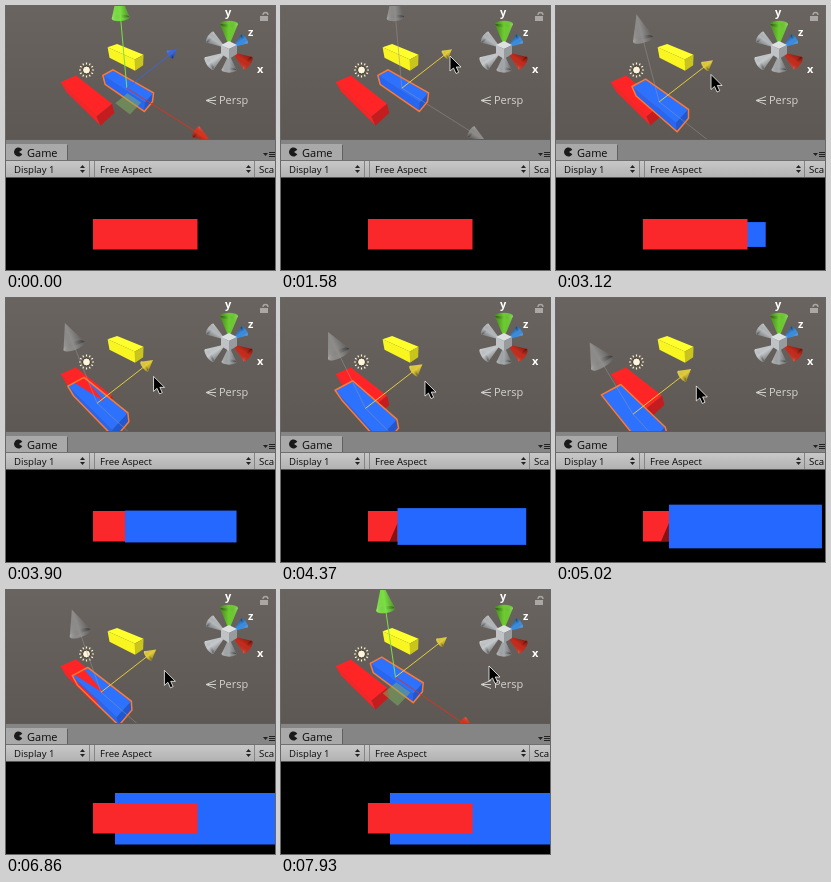
An HTML page with a canvas that plays this animation: 269 px wide and 264 px high, repeating every 7.99 s.

```html
<!DOCTYPE html>
<html lang="en">
<head>
<meta charset="utf-8">
<style>
html, body { margin: 0; width: 100%; height: 100%; overflow: hidden; background: #000; }
canvas { display: block; }
</style>
</head>
<body>
<canvas id="stage" width="269" height="264"></canvas>
<script>
const g = document.getElementById('stage').getContext('2d');
const LOOP = 7990;
const YELLOW = '#e3cc3c', GREY = '#8f8d8b';

// 0 to 1 between two times, slowing down for powers above 1
const ease = (t, from, to, power) =>
  1 - (1 - Math.min(1, Math.max(0, (t - from) / (to - from)))) ** power;

// Perspective given by the three vanishing points
function project([x, y, z]) {
  const a = -.079 * x, b = -.09 * y, c = .11 * z, w = 1 + a + b + c;
  return [(94 - 57 * a + 132 * b + 228 * c) / w, (103 - 30 * a + 207 * b - c) / w];
}

function poly(fill, pts, stroke, width = 1) {
  g.beginPath();
  pts.forEach(p => g.lineTo(p[0], p[1]));
  g.closePath();
  if (fill) { g.fillStyle = fill; g.fill(); }
  if (stroke) { g.strokeStyle = stroke; g.lineWidth = width; g.stroke(); }
}

function line(color, [x1, y1], [x2, y2], width = 1) {
  g.strokeStyle = color;
  g.lineWidth = width;
  g.beginPath();
  g.moveTo(x1, y1);
  g.lineTo(x2, y2);
  g.stroke();
}

function rect(color, x, y, w, h) {
  g.fillStyle = color;
  g.fillRect(x, y, w, h);
}

function text(str, x, y, size, color, weight = 400) {
  g.font = `${weight} ${size}px "Open Sans", sans-serif`;
  g.fillStyle = color;
  g.fillText(str, x, y);
}

function fade(y, h, top, bottom) {
  const fill = g.createLinearGradient(0, y, 0, y + h);
  fill.addColorStop(0, top);
  fill.addColorStop(1, bottom);
  rect(fill, 0, y, 269, h);
}

// Draws the three visible faces of a bar and returns its silhouette
function bar(x, z, thick, top, side, end) {
  const at = (i, j, k) => project([x + 1.75 * i, j * thick / 2, z + k * thick / 2]);
  const a = at(-1, 1, -1), b = at(-1, 1, 1), c = at(1, 1, 1), d = at(1, -1, 1);
  const e = at(1, -1, -1), f = at(-1, -1, -1), m = at(1, 1, -1);
  poly(top, [a, b, c, m]);
  poly(side, [a, m, e, f]);
  poly(end, [m, c, d, e]);
  return [a, b, c, d, e, f];
}

function cone(color, [bx, by], [tx, ty], r) {
  g.save();
  g.translate(bx, by);
  g.rotate(Math.atan2(ty - by, tx - bx));
  const shade = g.createLinearGradient(0, -r, 0, r);
  shade.addColorStop(0, 'rgba(255,255,255,.15)');
  shade.addColorStop(.5, 'rgba(0,0,0,0)');
  shade.addColorStop(1, 'rgba(0,0,0,.35)');
  for (const fill of [color, shade]) {
    poly(fill, [[0, -r], [Math.hypot(tx - bx, ty - by), 0], [0, r]]);
    g.beginPath();
    g.ellipse(0, 0, r * .35, r, 0, 0, 7);
    g.fill();
  }
  g.restore();
}

function sun() {
  for (let i = 0; i < 12; i++) {
    const at = r => [80.5 + r * Math.cos(i * Math.PI / 6), 64 + r * Math.sin(i * Math.PI / 6)];
    line('#fff3cf', at(5.5), at(7.5), 1.2);
  }
  g.beginPath();
  g.arc(80.5, 64, 4, 0, 7);
  g.fillStyle = '#fff5dc';
  g.fill();
  g.strokeStyle = '#3f382c';
  g.lineWidth = 1;
  g.stroke();
}

function axes() {
  const arm = (color, deg, r, reach) => {
    const c = Math.cos(deg * Math.PI / 180), s = Math.sin(deg * Math.PI / 180);
    cone(color, [223 + c * reach, 44 + s * reach], [223 + c * 4, 44 + s * 4], r);
  };
  arm('#b4b8ba', 214, 6.5, 23);
  arm('#3c8de0', -36, 5.5, 19);
  arm('#a4a8aa', 90, 7.5, 20);
  arm('#6dcc30', -90, 9, 26);
  arm('#c5c9cb', 146, 7.5, 24);
  arm('#c52c1c', 35, 7.5, 23);
  poly('#dde0e1', [[215, 39], [223, 35], [231, 39], [223, 43]]);
  poly('#bfc3c5', [[215, 39], [223, 43], [223, 53], [215, 48]]);
  poly('#979b9d', [[223, 43], [231, 39], [231, 48], [223, 53]]);
  text('y', 219, 10, 11, '#fff', 700);
  text('z', 242, 30, 11, '#fff', 700);
  text('x', 251, 67, 11, '#fff', 700);
  text('Persp', 213, 98, 11, '#d5d3d0');
  for (const dy of [-4, 0, 4]) line('#cfcdca', [200, 94.5], [210, 94.5 + dy]);
  rect('#aaa7a4', 254, 10, 8, 5);
  g.strokeStyle = '#aaa7a4';
  g.lineWidth = 1.3;
  g.beginPath();
  g.arc(259.5, 9, 2.5, Math.PI, 0);
  g.stroke();
}

// Move handles keep about the same size on screen
function handles(z, hover, drag) {
  const w = 1 + .11 * z, origin = project([0, 0, z]);
  const arrow = (axis, base, tip, r, color, active) => {
    const at = d => project([axis[0] * d, axis[1] * d, z + axis[2] * d]);
    const faint = drag && !active;
    line(faint ? 'rgba(150,148,146,.5)' : color, origin, at(base * w));
    cone(faint ? GREY : color, at(base * w), at(tip * w), r / w);
  };
  if (!drag) {
    const s = 1.2;
    poly('rgba(125,180,95,.5)', [[0, 0], [s, 0], [s, -s], [0, -s]].map(p => project([p[0], -.6, z + p[1]])));
  }
  arrow([1, 0, 0], 3.55, 4.05, 8, '#d8341f');
  arrow([0, 1, 0], 4, 4.9, 11.2, '#7be043');
  arrow([0, 0, 1], 4.9 * w, 6.4 * w, 6, hover || drag ? YELLOW : '#3a68d8', true);
}

function scene(z, hover, drag) {
  g.save();
  g.beginPath();
  g.rect(0, 0, 269, 134);
  g.clip();
  fade(0, 134, '#69645f', '#5d5853');
  bar(-3.15, 5.8, 1.4, '#ffff2d', '#f8f520', '#c9c51c');
  bar(-1.24, 0, 1, '#ff2527', '#fa2426', '#c41d20');
  const outline = bar(0, z, 1, '#2d72ff', '#2566f5', '#2158cf');

  // Where the bars share their top plane, part of the red one shows through
  if (Math.abs(z) < .6) {
    const far = -2.99, near = .51;
    poly('#ff2527', [[far, .5, -.5], [far, .5, .5], [near, .5, 0]].map(project));
    if (z >= 0) poly('#fa2426', [[far, .5, -.5], [near, .5, -.5], [near, -.5, -.5], [far, -.5, -.5]].map(project));
  }
  g.lineJoin = 'round';
  poly(null, outline, '#ff7930', 1.5);
  sun();
  handles(z, hover, drag);
  axes();
  g.restore();
}

function arrows(x) {
  for (const d of [-1, 1]) poly('#222', [[x, 163 + d], [x + 2.5, 163 + 4 * d], [x + 5, 163 + d]]);
}

function toolbar() {
  rect('#858585', 0, 134, 269, 20);
  rect('#5c5c5c', 0, 133, 269, 1);
  rect('#a9a9a9', 0, 138, 61, 17);
  rect('#606060', 61, 139, 1, 15);
  g.fillStyle = '#1a1a1a';
  g.beginPath();
  g.moveTo(13, 146);
  g.arc(12.5, 146, 4.5, .55, -.55);
  g.fill();
  text('Game', 21, 151, 11, '#0a0a0a');
  poly('#222', [[257, 147], [262, 147], [259.5, 150]]);
  for (const y of [146, 148, 150]) rect('#222', 263, y, 6, 1);
  fade(155, 16, '#c8c8c8', '#b2b2b2');
  rect('#707070', 0, 154, 269, 1);
  rect('#555', 0, 171, 269, 1);
  for (const x of [83, 88, 248]) rect('#858585', x, 155, 1, 16);
  text('Display 1', 8, 167, 9.6, '#0a0a0a');
  text('Free Aspect', 94, 167, 9.6, '#0a0a0a');
  text('Sca', 253, 167, 9.6, '#0a0a0a');
  arrows(74);
  arrows(240);
}

function game(z, trail) {
  const s = 1 / (1 + z / 3.26), left = 135.4 - 15.4 * s;
  const blue = () => rect('#2468ff', left, 228.5 - 15 * s, 105 * s, 30 * s);
  const red = () => rect('#fb282b', 87, 213, 104.5, 30.5);
  rect('#000', 0, 172, 269, 92);
  // The largest blue area stays behind while the bar retreats
  if (trail) rect('#2468ff', 109, 203, 160, 51.5);
  if (z >= 0) {
    blue();
    red();
  } else {
    red();
    if (z < -.6) poly('rgba(40,0,0,.55)', [[left - 8, 243.5], [left, 225], [left, 243.5]]);
    blue();
  }
}

function cursor(x, y) {
  const shape = [[0, 0], [0, 15], [3.5, 12], [6, 17.5], [8.7, 16.3], [6.3, 11], [11, 11]];
  poly('#000', shape.map(p => [x + p[0], y + p[1]]), 'rgba(255,255,255,.85)', .9);
}

function draw(t) {
  const enter = ease(t, 420, 1050, 1.5), pull = ease(t, 2000, 5960, 1.8);
  const push = ease(t, 6320, 7570, 1.1), leave = ease(t, 7780, 7930, 1);
  const z = 2.28 - 3.57 * pull + 2.93 * push;
  scene(z, t >= 1000, t >= 1230 && t < 7810);
  toolbar();
  game(z, t >= 5960);
  if (t > 420) cursor(248 - 79 * enter - 31 * pull + 44 * push + 26 * leave,
    14 + 36 * enter + 41 * pull - 23 * push + 8 * leave);
}

const start = performance.now();
function tick() {
  const t = (performance.now() - start) % LOOP;
  draw(t);
  requestAnimationFrame(tick);
}
tick();
</script>
</body>
</html>
```
